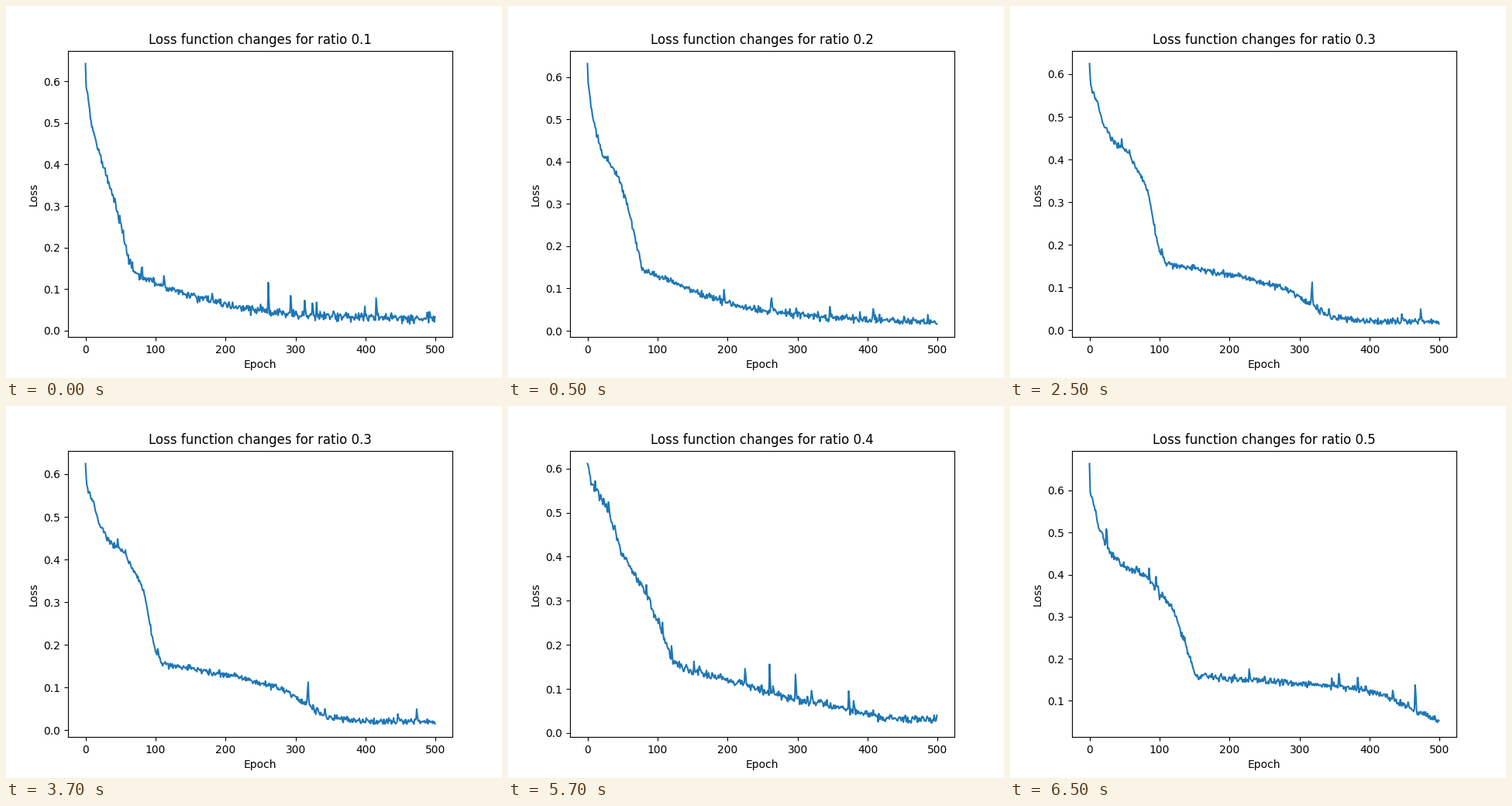
Animation of 640 by 480 pixels, one loop 8000 ms. Source, as a matplotlib script:

```python
import matplotlib.pyplot as plt
import numpy as np
from matplotlib.animation import FuncAnimation

EPOCHS = np.arange(500)
STEP_MS = 500
LOOP_STEPS = 16
STEPS_PER_RATIO = 4
SPIKE_CHANCE = 0.06

# Each run: lowest loss, jitter, then the bends of its trend as (epoch, loss).
RUNS = [
    (0.0158, 0.0052, [
        (0, 0.6425), (1, 0.59), (9, 0.495), (20, 0.425), (42, 0.31), (60, 0.185),
        (70, 0.142), (100, 0.11), (160, 0.08), (220, 0.056), (310, 0.035), (499, 0.028)]),
    (0.0158, 0.0040, [
        (0, 0.632), (1, 0.588), (8, 0.5), (20, 0.425), (32, 0.395), (48, 0.35),
        (60, 0.28), (78, 0.145), (160, 0.088), (230, 0.052), (320, 0.033), (499, 0.02)]),
    (0.0147, 0.0037, [
        (0, 0.6246), (2, 0.575), (20, 0.485), (35, 0.44), (57, 0.414), (83, 0.33),
        (98, 0.195), (110, 0.157), (220, 0.125), (280, 0.098), (345, 0.031), (400, 0.021)]),
    (0.0202, 0.0050, [
        (0, 0.6112), (5, 0.57), (22, 0.53), (32, 0.49), (50, 0.405), (86, 0.31),
        (120, 0.17), (135, 0.146), (200, 0.12), (300, 0.074), (360, 0.057), (430, 0.032)]),
    (0.0449, 0.0042, [
        (0, 0.6637), (1, 0.6), (14, 0.508), (32, 0.447), (50, 0.418), (84, 0.392),
        (120, 0.315), (152, 0.159), (300, 0.141), (370, 0.133), (420, 0.113), (499, 0.05)]),
]


def loss_curve(seed, low, jitter, trend):
    """Piecewise trend with Gaussian jitter and occasional fading spikes."""
    rng = np.random.default_rng(seed)
    loss = np.interp(EPOCHS, *zip(*trend))
    start = loss[0]
    spikes = rng.exponential(3.5 * jitter, EPOCHS.size)
    spikes *= rng.random(EPOCHS.size) < SPIKE_CHANCE
    loss += rng.normal(0, jitter, EPOCHS.size) + spikes
    loss[1:] += spikes[:-1] / 2
    loss[0] = start
    return np.clip(loss, low, start)


CURVES = [loss_curve(seed, *run) for seed, run in enumerate(RUNS)]

fig, ax = plt.subplots(figsize=(6.4, 4.8), dpi=100)
line, = ax.plot(EPOCHS, CURVES[0])
ax.set_xlabel("Epoch")
ax.set_ylabel("Loss")


def update(step):
    # The loop opens on the last step of the first ratio.
    index = (step + STEPS_PER_RATIO - 1) // STEPS_PER_RATIO
    loss, low = CURVES[index], RUNS[index][0]
    pad = 0.05 * (loss[0] - low)
    line.set_ydata(loss)
    ax.set_ylim(low - pad, loss[0] + pad)
    ax.set_title(f"Loss function changes for ratio {(index + 1) / 10:.1f}")
    return line,


anim = FuncAnimation(fig, update, frames=LOOP_STEPS, interval=STEP_MS,
                     repeat=True, repeat_delay=0, blit=False)
plt.show()
```
